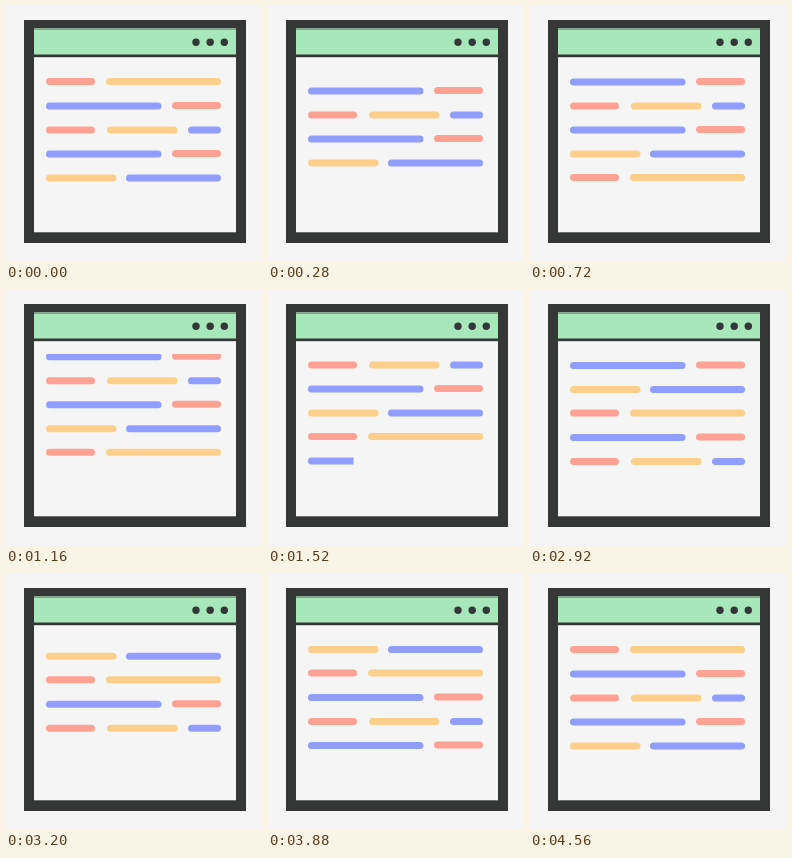
Animation, 256 px wide and 256 px high, one loop 4800 ms. Source, as an HTML page with a canvas:

```html
<!DOCTYPE html>
<html lang="en">
<head>
<meta charset="utf-8">
<title>Scrolling code window</title>
<style>
html, body { margin: 0; width: 100%; height: 100%; overflow: hidden; background: #f5f5f5; }
canvas { display: block; width: 256px; height: 256px; }
</style>
</head>
<body>
<canvas id="stage" width="256" height="256"></canvas>
<script>
const ctx = document.getElementById('stage').getContext('2d');

const LOOP = 4800, CYCLE = 960, TICK = 40;
const SCROLL_END = 480, REVEAL_END = 720;
const DARK = '#343735', PAPER = '#f5f5f5', GREEN = '#a8e7bc';
const RED = '#ffa293', ORANGE = '#fcd08c', BLUE = '#929eff';

const LEFT = 40, RIGHT = 215.5, TOP = 64, BAR = 7;
const BLOCK = 120;                      // height of the five repeating lines
const STOPS = [0, 24, 48.9, 72, 96, 120]; // scroll offset at each rest

// Each line: centre y, then bars as [start, end, colour, y shift]
const LINES = [
  { y: 75.5, bars: [[40, 89, RED], [100, 215, ORANGE]] },
  { y: 100, bars: [[40, 155.5, BLUE], [166, 215, RED, -0.5]] },
  { y: 124, bars: [[40, 89, RED], [101, 171.5, ORANGE], [182, 215, BLUE]] },
  { y: 148, bars: [[40, 155.5, BLUE], [166, 215, RED, -0.5]] },
  { y: 172, bars: [[40, 110.5, ORANGE], [120, 215, BLUE]] }
];

function ease(p) {
  p = Math.min(1, Math.max(0, p));
  return p * p * (3 - 2 * p);
}

function rect(x0, y0, x1, y1, color) {
  ctx.fillStyle = color;
  ctx.fillRect(x0, y0, x1 - x0, y1 - y0);
}

function drawWindow() {
  rect(0, 0, 256, 256, PAPER);
  rect(18, 14, 240, 237, DARK);
  rect(28, 22.6, 230, 226.3, PAPER);
  rect(28, 22.6, 230, 49, GREEN);
  rect(28, 22.6, 230, 24, '#7ba888');
  rect(28, 48.5, 230, 51.2, DARK);
  ctx.fillStyle = DARK;
  for (const x of [190, 204.2, 218.3]) {
    ctx.beginPath();
    ctx.arc(x, 36.3, 3.7, 0, Math.PI * 2);
    ctx.fill();
  }
}

function drawLine(index, scroll) {
  const line = LINES[index % LINES.length];
  const y = line.y + BLOCK * Math.floor(index / LINES.length) - scroll;
  for (const [x0, x1, color, shift = 0] of line.bars) {
    ctx.fillStyle = color;
    ctx.beginPath();
    ctx.roundRect(x0, y + shift - BAR / 2, x1 - x0, BAR, BAR / 2);
    ctx.fill();
  }
}

function clipped(x0, y0, x1, y1, draw) {
  ctx.save();
  ctx.beginPath();
  ctx.rect(x0, y0, x1 - x0, y1 - y0);
  ctx.clip();
  draw();
  ctx.restore();
}

function render(time) {
  const t = Math.floor((time % LOOP) / TICK) * TICK;
  const cycle = Math.floor(t / CYCLE);
  const phase = t % CYCLE;
  const from = STOPS[cycle];
  const scroll = from + (STOPS[cycle + 1] - from) * ease(phase / SCROLL_END);
  const reveal = ease((phase - SCROLL_END) / (REVEAL_END - SCROLL_END));

  drawWindow();
  clipped(28, TOP, 230, 226, () => {
    for (let i = 0; i < LINES.length; i++) drawLine(cycle + i, scroll);
  });
  if (reveal > 0) {
    clipped(LEFT, TOP, LEFT + (RIGHT - LEFT) * reveal, 226, () => {
      drawLine(cycle + LINES.length, scroll);
    });
  }
}

const start = performance.now();
function frame() {
  render(performance.now() - start);
  requestAnimationFrame(frame);
}
frame();
</script>
</body>
</html>
```
